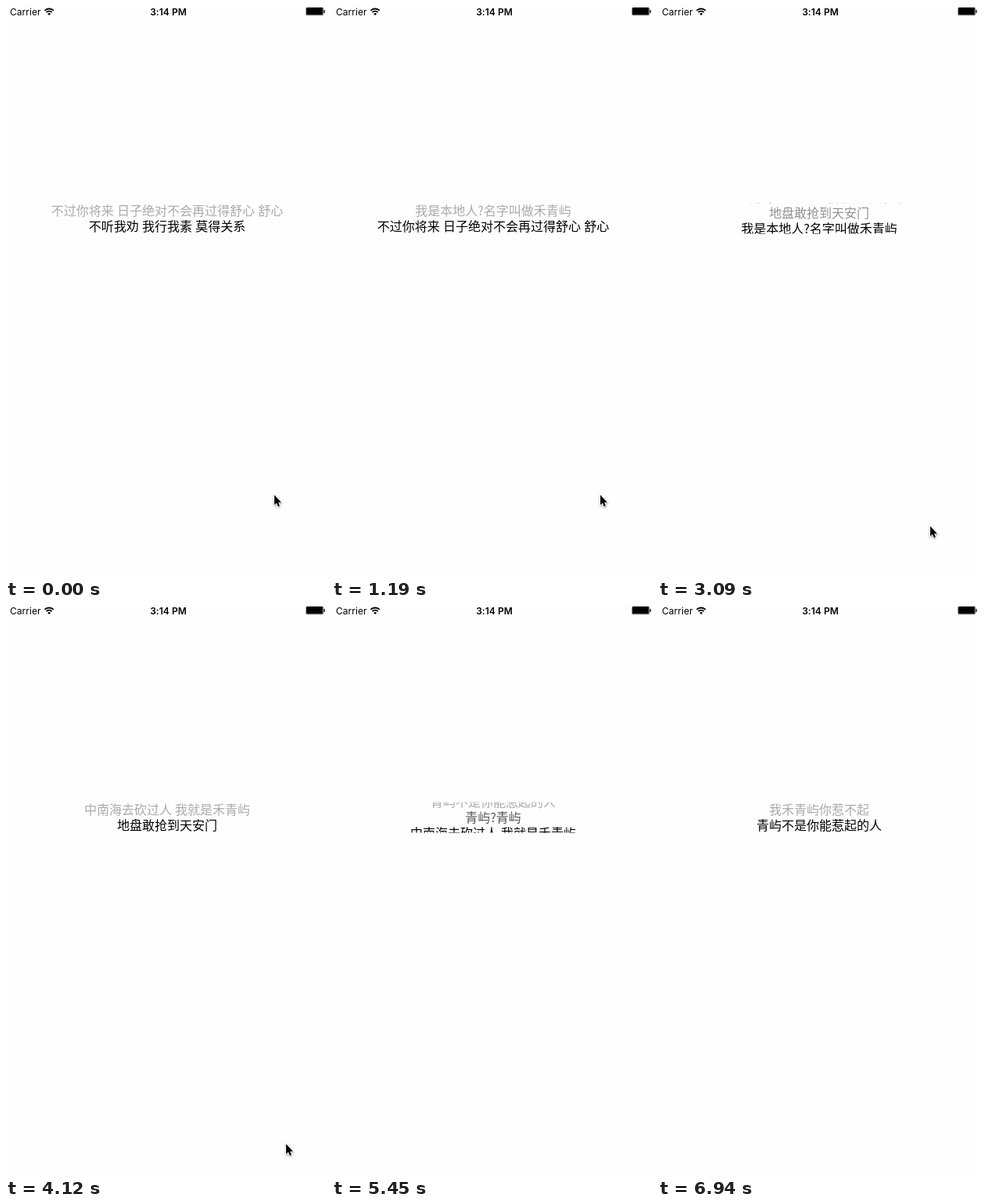
Recreate the animation shown at these times as an HTML page. Size 409 by 731 pixels, loop 7.38 s.

```html
<!DOCTYPE html>
<html lang="zh-CN">
<head>
<meta charset="utf-8">
<title>Scrolling lines</title>
<style>
  html, body { margin: 0; width: 100%; height: 100%; overflow: hidden; background: #fefefe; }
  #stage { position: relative; width: 409px; height: 731px; overflow: hidden; color: #000; }
  #stage > * { position: absolute; }
  .bar { top: 0; font: 12px/15px Inter, sans-serif; white-space: pre; letter-spacing: .05px; }
  .carrier { left: 5px; }
  .clock { left: 157.5px; width: 100px; text-align: center; font-weight: 600; }
  svg { left: 0; top: 0; overflow: visible; }
  #ticker { left: 6px; top: 252px; width: 400px; height: 40px; clip-path: inset(.6px 0); }
  #ticker div {
    position: absolute; left: 0; top: -1px; width: 100%; height: 20px;
    font: 16px/20px "Noto Sans CJK SC", "Noto Sans CJK", sans-serif;
    text-align: center; white-space: pre; word-spacing: .6px;
  }
  #cursor { filter: drop-shadow(0 1px 1px rgba(0, 0, 0, .4)); }
</style>
</head>
<body>
<div id="stage">
  <span class="bar carrier">Carrier</span>
  <span class="bar clock">3:14 PM</span>
  <svg width="409" height="15">
    <g fill="none" stroke="#000" stroke-width="1.8">
      <path d="M49.4 5.9a8 8 0 0 1 11.4 0"/>
      <path d="M51.5 8.2a5.1 5.1 0 0 1 7.2 0"/>
    </g>
    <path d="M55.1 12l-2-2.1a2.9 2.9 0 0 1 4 0z"/>
    <rect x="383.4" y="2.2" width="22.2" height="9.6" rx="1.5" fill="none" stroke="#000" stroke-width=".5"/>
    <rect x="384" y="2" width="20.8" height="9.2" rx=".8"/>
    <rect x="406.2" y="5" width="1.3" height="4" rx=".6"/>
  </svg>
  <div id="ticker"></div>
  <svg id="cursor" width="12" height="18">
    <path d="M0 0V12.8L2.9 10.2L4.8 14.8L6.9 13.9L5 9.4H8.9Z" stroke="#fff" stroke-width="1.6" paint-order="stroke"/>
  </svg>
</div>
<script>
  const LOOP = 7380, ROW = 20, STEP = 146;
  const lines = [
    "不听我劝 我行我素 莫得关系",
    "不过你将来 日子绝对不会再过得舒心 舒心",
    "我是本地人?名字叫做禾青屿",
    "地盘敢抢到天安门",
    "中南海去砍过人 我就是禾青屿",
    "青屿?青屿",
    "青屿不是你能惹起的人",
    "我禾青屿你惹不起"
  ];
  const starts = [750, 1900, 3090, 4270, 5300, 6490];
  const slide = [3, 10, 17, 20];
  // time, x, y of the pointer tip
  const pointer = [
    [0, 343, 626], [1490, 343, 639], [1620, 344, 654], [1900, 348, 666],
    [3830, 350, 671], [3980, 354, 681], [4120, 358, 690],
    [4270, 363, 705], [4420, 369, 721], [4560, 380, 760]
  ];

  const ticker = document.getElementById("ticker");
  const cursor = document.getElementById("cursor");
  const rows = lines.map(text => {
    const row = document.createElement("div");
    row.textContent = text;
    ticker.append(row);
    return row;
  });

  function scrollAt(t) {
    if (t < 150) return -.3;
    return starts.reduce((sum, start) => {
      const i = Math.min(Math.floor((t - start) / STEP), slide.length - 1);
      return sum + (i < 0 ? 0 : slide[i]);
    }, 0);
  }

  function draw(t) {
    const scroll = scrollAt(t);
    rows.forEach((row, i) => {
      const y = scroll + (1 - i) * ROW;
      const gray = Math.round(170 * (1 - Math.min(Math.max(y / ROW, 0), 1)));
      row.style.transform = `translateY(${y}px)`;
      row.style.color = `rgb(${gray}, ${gray}, ${gray})`;
    });
    const [, x, y] = pointer.filter(p => p[0] <= t).pop();
    cursor.style.transform = `translate(${x}px, ${y}px)`;
  }

  function tick() {
    draw(performance.now() % LOOP);
    requestAnimationFrame(tick);
  }
  tick();
</script>
</body>
</html>
```
